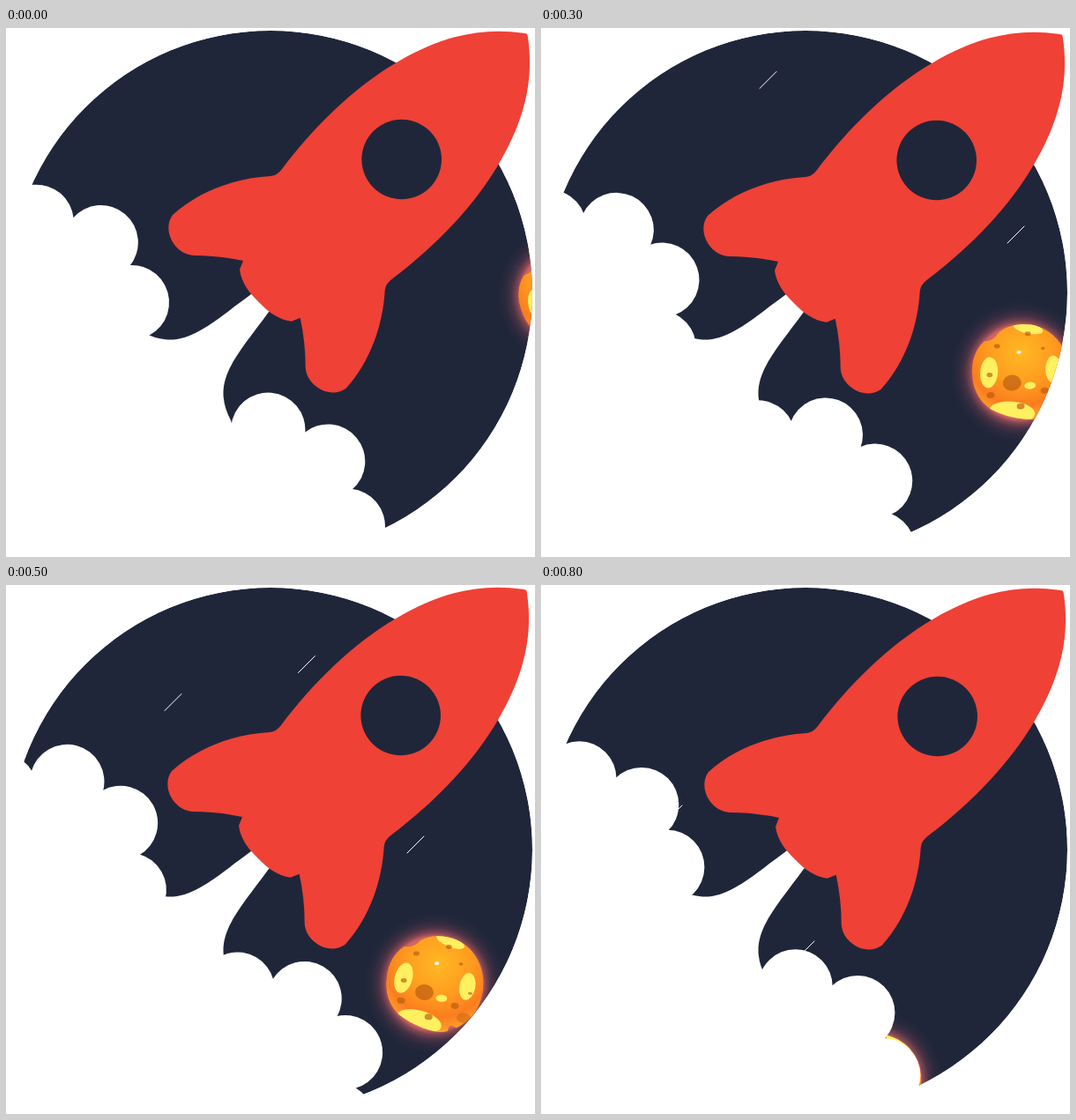
An HTML page for the animation above (0.9 s loop, 600x600 px).

```html
<!DOCTYPE html>
<html lang="en">
<head>
<meta charset="utf-8">
<title>Rocket in flight</title>
<style>
  html, body { margin: 0; width: 100%; height: 100%; overflow: hidden; background: #fff; }
  svg { display: block; width: 100vw; height: 100vh; }
</style>
</head>
<body>
<svg viewBox="0 0 600 600">
  <defs>
    <clipPath id="sky"><circle cx="300" cy="300" r="297"/></clipPath>
    <clipPath id="globe">
      <path d="M-38 -39C-31 -38 -26 -41 -22 -46C-10 -56 10 -56 24 -50C43 -42 55 -22 55 0C55 20 46 38 32 47C29 50 27 46 22 46C18 48 22 53 17 54C3 56 -20 50 -37 39C-49 30 -56 15 -55 -2C-55 -18 -49 -31 -38 -39Z"/>
    </clipPath>
    <radialGradient id="glow">
      <stop offset=".66" stop-color="#f0706a" stop-opacity=".85"/>
      <stop offset=".72" stop-color="#e0666a" stop-opacity=".5"/>
      <stop offset=".8" stop-color="#d05a68" stop-opacity=".22"/>
      <stop offset=".9" stop-color="#b04c60" stop-opacity=".07"/>
      <stop offset="1" stop-color="#b04c60" stop-opacity="0"/>
    </radialGradient>
    <radialGradient id="lava" cx=".52" cy=".3" r=".72">
      <stop offset="0" stop-color="#ffb923"/>
      <stop offset=".45" stop-color="#ff9c20"/>
      <stop offset=".75" stop-color="#fb7d1e"/>
      <stop offset="1" stop-color="#ffac30"/>
    </radialGradient>
  </defs>

  <g clip-path="url(#sky)">
    <circle cx="300" cy="300" r="297" fill="#20263a"/>
    <g id="stars" stroke="#fff" stroke-linecap="round"></g>
    <g id="planet">
      <circle r="80" fill="url(#glow)"/>
      <g clip-path="url(#globe)">
        <circle r="56" fill="url(#lava)"/>
        <g fill="#fff060">
          <ellipse rx="10" ry="17.5" transform="translate(-36 -3) rotate(10)"/>
          <ellipse rx="9" ry="15.5" transform="translate(37 0) rotate(5)"/>
          <ellipse rx="17" ry="6" transform="translate(13 -49) rotate(17)"/>
          <ellipse rx="26" ry="12" transform="translate(-14 44) rotate(10)"/>
          <ellipse cx="9" cy="16" rx="6.5" ry="4"/>
        </g>
        <g id="craters" fill="#b85a10" fill-opacity=".65">
          <ellipse cx="-11" cy="11" rx="10.5" ry="9"/>
          <ellipse cx="36" cy="36" rx="8" ry="6" fill-opacity=".4"/>
        </g>
        <ellipse cy="-23" rx="2.6" ry="1.9" fill="#fff"/>
      </g>
    </g>
  </g>

  <g fill="#fff">
    <path id="smoke" d="M292 288L278 302C238 331 212 356 181 353.3Q168 352 155 345L100 330H0V600H10L300 310Z"/>
    <use href="#smoke" transform="matrix(0 -1 -1 0 600 600)"/>
    <g id="clouds"></g>
  </g>

  <g id="rocket" fill="#ef4136">
    <path id="half" d="M591 6.7Q589.5 6 586.7 5.7C538 -1.3 493 9.7 443.7 38.7C394 67.5 348 113.5 313 160Q308 167 300 168C262 170 220 184 189 212C176 230 192 257 213 258C232 258 250 260 269 264L265 274C267 288 275 300 287 311L292 314L588 14Z"/>
    <use href="#half" transform="matrix(0 -1 -1 0 597.7 597.7)"/>
    <circle cx="448.7" cy="149" r="45.3" fill="#20263a"/>
  </g>
</svg>

<script>
const LOOP = 900, STEP = 100;
const byId = id => document.getElementById(id);

function add(parent, tag, attrs) {
  const node = document.createElementNS("http://www.w3.org/2000/svg", tag);
  for (const key in attrs) node.setAttribute(key, attrs[key]);
  return parent.appendChild(node);
}

function place(node, [x, y], angle = 0) {
  node.setAttribute("transform", `translate(${x} ${y}) rotate(${angle})`);
}

// Linear path through [time, x, y] keys, extended past both ends.
function along(keys, t) {
  let i = 1;
  while (i < keys.length - 1 && t > keys[i][0]) i++;
  const [t0, x0, y0] = keys[i - 1], [t1, x1, y1] = keys[i];
  const k = (t - t0) / (t1 - t0);
  return [x0 + (x1 - x0) * k, y0 + (y1 - y0) * k];
}

// Small craters spread around the planet by the golden angle.
for (let i = 0; i < 8; i++) {
  const angle = 0.75 + i * 2.4, distance = 34 + i * 1.5;
  add(byId("craters"), "ellipse", {
    cx: distance * Math.cos(angle), cy: distance * Math.sin(angle),
    rx: 4.5 - i % 3, ry: 3.5 - i % 3
  });
}

const planetPath = [[0, 637, 303], [200, 579, 362], [400, 509.5, 419],
                    [500, 486.5, 452], [800, 376, 562]];

// Thin stars drift; the two thick ones rush past.
const drift = (...path) => ({ size: 19, width: 1, path });
const rush = (x, y) =>
  ({ size: 31, width: 4, path: [[200, x, y], [300, x - 200, y + 200]] });
const stars = [
  drift([200, 279, 41], [400, 217, 96], [600, 143, 189]),
  drift([400, 395, 43], [600, 268, 156]),
  drift([200, 569, 211], [400, 489, 277], [600, 421, 331], [800, 291, 423]),
  rush(190.5, 39.5),
  rush(459, 429)
];
for (const star of stars) {
  star.node = add(byId("stars"), "line",
    { x2: star.size, y2: -star.size, "stroke-width": star.width });
}

// Each cloud is a ring of eight puffs that turns by one puff per loop.
const clouds = [
  { x: 43, y: 319.7, start: -4.8, turn: -45 },
  { x: 288, y: 555.6, start: -84.7, turn: 45 }
];
for (const cloud of clouds) {
  cloud.node = add(byId("clouds"), "g", {});
  add(cloud.node, "circle", { r: 102 });
  for (let i = 0; i < 8; i++) {
    add(cloud.node, "circle", { cx: 100.2, r: 42.2, transform: `rotate(${i * 45})` });
  }
}

// One slow bob per loop, with a sideways rattle that builds up.
const shake = step => [
  Math.round(Math.cos(step * Math.PI) * step / 7),
  Math.round(2 * Math.sin(step * Math.PI / 4))
];

function draw() {
  const step = Math.floor(performance.now() % LOOP / STEP);
  const t = step * STEP;
  place(byId("rocket"), shake(step));
  place(byId("planet"), along(planetPath, t), (t - 400) * 0.053);
  for (const star of stars) place(star.node, along(star.path, t));
  for (const c of clouds) place(c.node, [c.x, c.y], c.start + c.turn * t / LOOP);
  requestAnimationFrame(draw);
}
draw();
</script>
</body>
</html>
```
